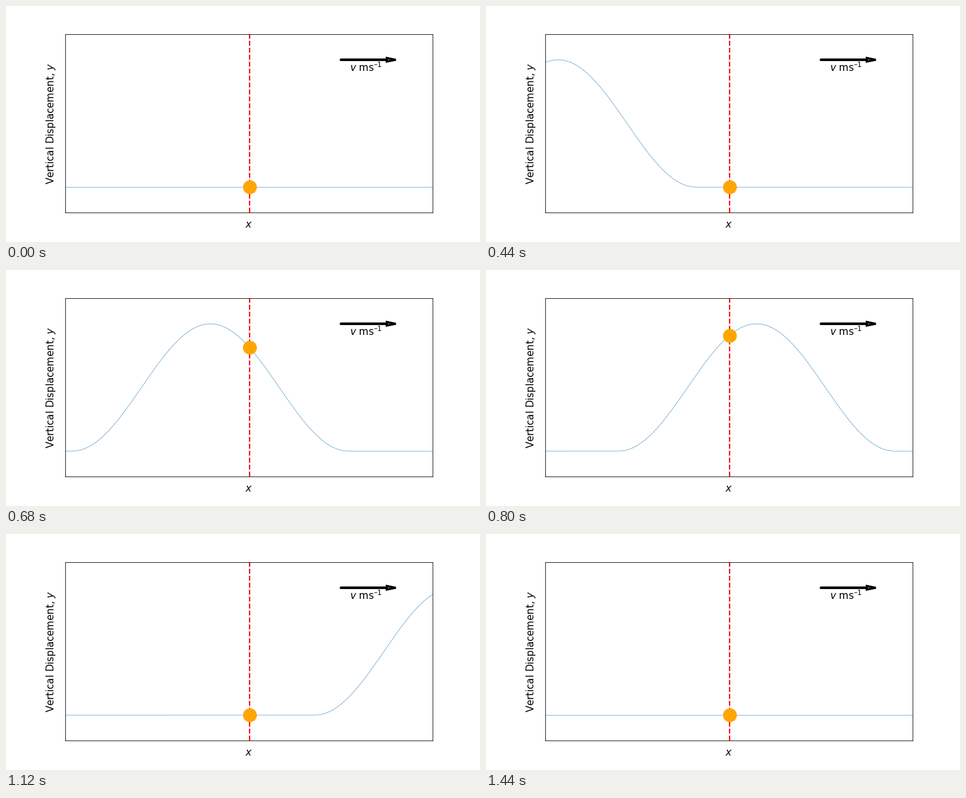
Animation, 720 px wide and 360 px high, one loop 2 s. Source, as a matplotlib script:

```python
import numpy as np
import matplotlib.pyplot as plt
from matplotlib.animation import FuncAnimation

W, H, DPI = 720, 360, 72
FRAMES, INTERVAL = 50, 40
PULSE = 0.75          # pulse length, in axes widths
SPEED = 0.06          # axes widths per frame
START = -0.25         # leading edge in the first frame
FONT = 15

plt.rcParams["font.family"] = "DejaVu Sans"

fig = plt.figure(figsize=(W / DPI, H / DPI), dpi=DPI, facecolor="white")
ax = fig.add_axes([0.125, 0.125, 0.775, 0.755])
ax.set(xlim=(0, 1), ylim=(-0.2, 1.2), xticks=[], yticks=[])

# The string runs past both sides of the axes
x = np.linspace(-1, 2, 1000)
mid = len(x) // 2


def pulse(front):
    behind = front - x
    inside = (behind > 0) & (behind < PULSE)
    return np.where(inside, np.sin(np.pi * behind / PULSE) ** 2, 0.0)


def label(px, py, text, **kw):
    fig.text(px / W, 1 - py / H, text, fontsize=FONT, ha="center",
             va="baseline", **kw)


wave, = ax.plot(x, np.zeros_like(x), color="C0", lw=0.5)
ax.axvline(x[mid], color="red", ls="--", lw=2)
ball, = ax.plot([x[mid]], [0], "o", color="orange", ms=20)

ax.arrow(0.75, 1, 0.125, 0, width=0.001, head_width=0.03, head_length=0.025,
         fc="C0", ec="black", lw=3)
ax.text(0.775, 0.905, "$v$ ms$^{–1}$", fontsize=FONT)
label(368.7, 338, "$x$")
label(73.5, 179.3, "Vertical Displacement, $y$", rotation=90,
      rotation_mode="anchor")


def update(i):
    y = pulse(START + SPEED * i)
    wave.set_ydata(y)
    ball.set_ydata([y[mid]])
    return wave, ball


anim = FuncAnimation(fig, update, frames=FRAMES, interval=INTERVAL,
                     repeat=True, repeat_delay=0)
plt.show()
```
